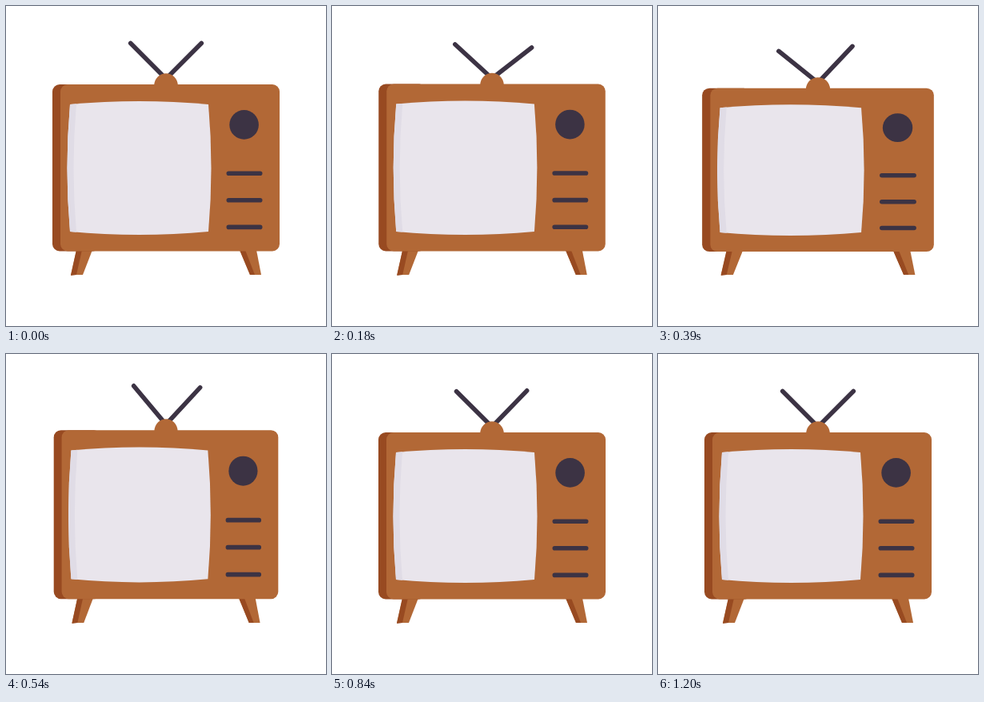
Animation of 400x400 px, one loop 3260 ms. Source, as an HTML page:

```html
<!DOCTYPE html>
<html lang="en">
<head>
<meta charset="utf-8">
<title>Bouncing television</title>
<style>
  html, body { margin: 0; width: 100%; height: 100%; overflow: hidden; background: #fff; }
  svg { display: block; width: 100%; height: 100%; }
  .case { fill: #b26836; }
  .shade { fill: #984a21; }
  .ink { fill: #3c3344; }
  .line { stroke: #3c3344; stroke-width: 5.6; stroke-linecap: round; }
</style>
</head>
<body>
<svg viewBox="0 0 400 400">
  <g id="tv">
    <path class="line" id="left" d="M200 91L155.7 46.5"/>
    <path class="line" id="right" d="M200 91L244.3 46.5"/>
    <path class="case" d="M185 100C186 79 214 79 215 100Z"/>

    <path class="case" d="M88 305H108L96 336H81Z"/>
    <path class="shade" d="M88 305H95L88 336L81 337Z"/>
    <path class="case" d="M292 305H313L319 336H305Z"/>
    <path class="shade" d="M292 305H299L311 336H305Z"/>

    <rect class="shade" x="58" y="98" width="60" height="208.5" rx="9"/>
    <rect class="case" x="68" y="98" width="274" height="208.5" rx="9"/>

    <path fill="#e9e5ec" d="M80 123Q166 115 253 123Q260 203 253 282Q166 290 80 282Q73 203 80 123Z"/>
    <path fill="#e0dce6" d="M80 123Q73 203 80 282L88 282.7Q81 203 88 122.3Z"/>

    <circle class="ink" cx="297.6" cy="148.4" r="18.3"/>
    <path class="line" d="M278.3 209.2H317.7M278.3 242.8H317.7M278.3 276.4H317.7"/>
  </g>
</svg>
<script>
  const LOOP = 3260;
  const $ = id => document.getElementById(id);

  // Each track is a list of [time in ms, value] turning points.
  const squash = [[0, 0], [100, .0775], [240, -.05], [390, .02], [540, -.012], [700, 0]];
  const leftTilt = [[30, 0], [360, -5.9], [545, 4.3], [720, -1.5], [880, 0], [1000, .4], [1200, 0]];
  const rightTilt = [[60, 0], [240, 9.8], [450, -5.5], [630, 2.5], [800, -1], [1000, .4], [1200, 0]];

  function sample(track, t) {
    const i = track.findIndex(key => key[0] > t);
    if (i === 0) return track[0][1];
    if (i < 0) return track[track.length - 1][1];
    const [t0, v0] = track[i - 1], [t1, v1] = track[i];
    const ease = (1 - Math.cos(Math.PI * (t - t0) / (t1 - t0))) / 2;
    return v0 + (v1 - v0) * ease;
  }

  function tilt(id, degrees) {
    $(id).setAttribute('transform', `rotate(${degrees} 200 91)`);
  }

  function draw(t) {
    const s = sample(squash, t);
    $('tv').setAttribute('transform',
      `translate(200 336) scale(${1 + s} ${1 - s}) translate(-200 -336)`);
    tilt('left', sample(leftTilt, t));
    tilt('right', sample(rightTilt, t));
  }

  const start = performance.now();
  function tick() {
    draw((performance.now() - start) % LOOP);
    requestAnimationFrame(tick);
  }
  tick();
</script>
</body>
</html>
```
